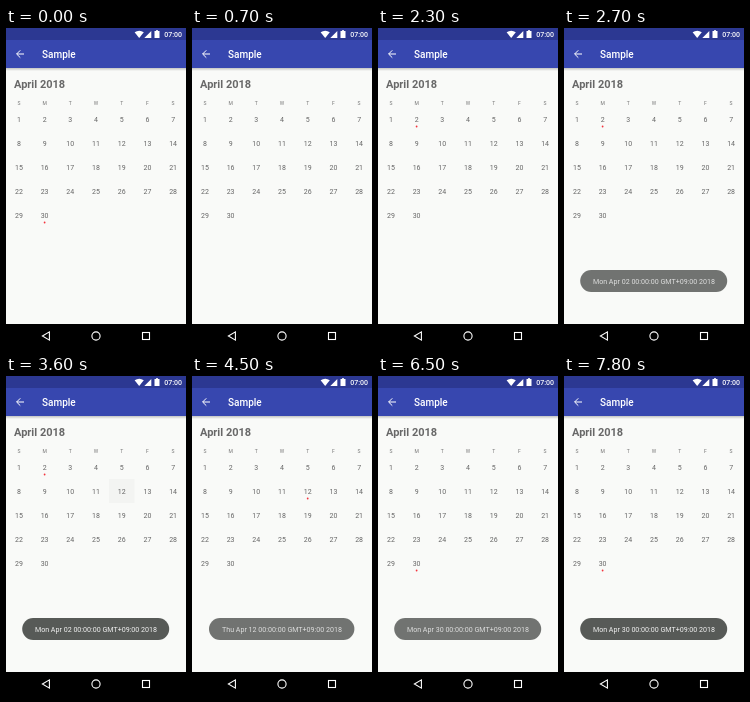
Recreate the animation shown at these times as an HTML page with a canvas. Size 180 px wide and 320 px high, loop 8 s.

```html
<!DOCTYPE html>
<html lang="en">
<head>
<meta charset="utf-8">
<title>Calendar</title>
<style>
html, body { margin: 0; width: 100%; height: 100%; overflow: hidden; background: #f9faf8; }
canvas { display: block; width: 180px; height: 320px; }
</style>
</head>
<body>
<canvas id="stage"></canvas>
<script>
const LOOP = 8000, STEP = 100;
const canvas = document.getElementById('stage');
const ctx = canvas.getContext('2d');
const ratio = window.devicePixelRatio || 1;
canvas.width = 180 * ratio;
canvas.height = 320 * ratio;

// [day, from, to]
const marks = [[30, 0, 100], [2, 2200, 3800], [12, 3800, 5100], [30, 5100, LOOP]];
const presses = [[2, 1950, 2300], [12, 3550, 3900], [30, 4750, 5100], [25, 5700, 6200]];
// [text, fade-in start, fade-out start, half width]
const toasts = [
  ['Mon Apr 02 00:00:00 GMT+09:00 2018', 2400, 4100, 73.5],
  ['Thu Apr 12 00:00:00 GMT+09:00 2018', 4200, 6100, 72.7],
  ['Mon Apr 30 00:00:00 GMT+09:00 2018', 6200, LOOP, 73.5]
];

const clamp = v => Math.max(0, Math.min(1, v));
const colX = c => 90 + 25.7 * (c - 3);
const cell = day => ({ x: colX((day - 1) % 7), y: 91 + 24 * Math.floor((day - 1) / 7) });

function rect(x, y, w, h, color) {
  ctx.fillStyle = color;
  ctx.fillRect(x, y, w, h);
}

function text(str, x, y, size, color, weight = 400, align = 'center') {
  ctx.font = `${weight} ${size}px Roboto, sans-serif`;
  ctx.textAlign = align;
  ctx.fillStyle = color;
  ctx.fillText(str, x, y);
}

function path(points, close) {
  ctx.beginPath();
  points.forEach(([x, y]) => ctx.lineTo(x, y));
  if (close) ctx.closePath();
}

function circle(x, y, r) {
  ctx.beginPath();
  ctx.arc(x, y, r, 0, Math.PI * 2);
}

function statusBar() {
  rect(0, 0, 180, 12, '#2c3892');
  ctx.fillStyle = '#fff';
  ctx.beginPath();
  ctx.moveTo(133.2, 10);
  ctx.lineTo(128.6, 4.3);
  ctx.quadraticCurveTo(133.2, 1.3, 137.8, 4.3);
  ctx.fill();
  path([[138.3, 10], [145.3, 3], [145.3, 10]], true);
  ctx.fill();
  ctx.fillRect(148.5, 3, 5, 7);
  ctx.fillRect(150, 2.2, 2, 1);
  text('07:00', 176, 8.7, 7, '#fff', 500, 'right');
}

function appBar() {
  rect(0, 12, 180, 28, '#3747af');
  const shade = ctx.createLinearGradient(0, 40, 0, 43);
  shade.addColorStop(0, 'rgba(0,0,0,.22)');
  shade.addColorStop(1, 'rgba(0,0,0,0)');
  rect(0, 40, 180, 3, shade);
  ctx.strokeStyle = '#fff';
  ctx.lineWidth = 1;
  path([[18, 26], [10.7, 26]]);
  ctx.stroke();
  path([[14.3, 22.3], [10.6, 26], [14.3, 29.7]]);
  ctx.stroke();
  text('Sample', 36, 30, 10, '#fff', 500, 'left');
}

function navBar() {
  rect(0, 296, 180, 24, '#000');
  ctx.strokeStyle = '#fff';
  ctx.lineWidth = 1.1;
  path([[36.4, 308], [43.4, 303.9], [43.4, 312.1]], true);
  ctx.stroke();
  circle(90, 308, 4.1);
  ctx.stroke();
  ctx.strokeRect(136.5, 304.5, 7, 7);
}

function calendar(t) {
  for (const [day, from, to] of presses) {
    if (t < from || t >= to) continue;
    const { x, y } = cell(day);
    const level = clamp((t - from) / 100);
    rect(x - 12.85, y - 12, 25.7, 24, `rgba(0,0,0,${0.045 * level})`);
  }
  text('April 2018', 8, 60, 11, '#686868', 700, 'left');
  [...'SMTWTFS'].forEach((name, c) => text(name, colX(c), 77, 5, '#777'));
  for (let day = 1; day <= 30; day++) {
    const { x, y } = cell(day);
    text(day, x, y + 2.6, 7, '#666');
  }
  for (const [day, from, to] of marks) {
    if (t < from || t >= to) continue;
    const { x, y } = cell(day);
    ctx.fillStyle = '#f4333d';
    circle(x, y + 7.5, 0.9);
    ctx.fill();
  }
}

function toast([label, start, end, half], t) {
  if (t < start) return;
  const rise = 1 - (1 - clamp((t - start) / 500)) ** 2;
  ctx.globalAlpha = rise * (1 - clamp((t - end) / 400));
  ctx.fillStyle = '#575a57';
  ctx.beginPath();
  ctx.roundRect(89.7 - half, 242, half * 2, 22, 11);
  ctx.fill();
  text(label, 90, 255.6, 7.1, '#f4f4f4');
  ctx.globalAlpha = 1;
}

function draw(now) {
  const t = Math.floor((now % LOOP) / STEP) * STEP;
  ctx.setTransform(ratio, 0, 0, ratio, 0, 0);
  rect(0, 0, 180, 320, '#f9faf8');
  calendar(t);
  statusBar();
  appBar();
  toasts.forEach(item => toast(item, t));
  navBar();
}

let origin;
function tick(now) {
  origin ??= now;
  draw(Math.max(0, now - origin));
  requestAnimationFrame(tick);
}
draw(0);
requestAnimationFrame(tick);
</script>
</body>
</html>
```
